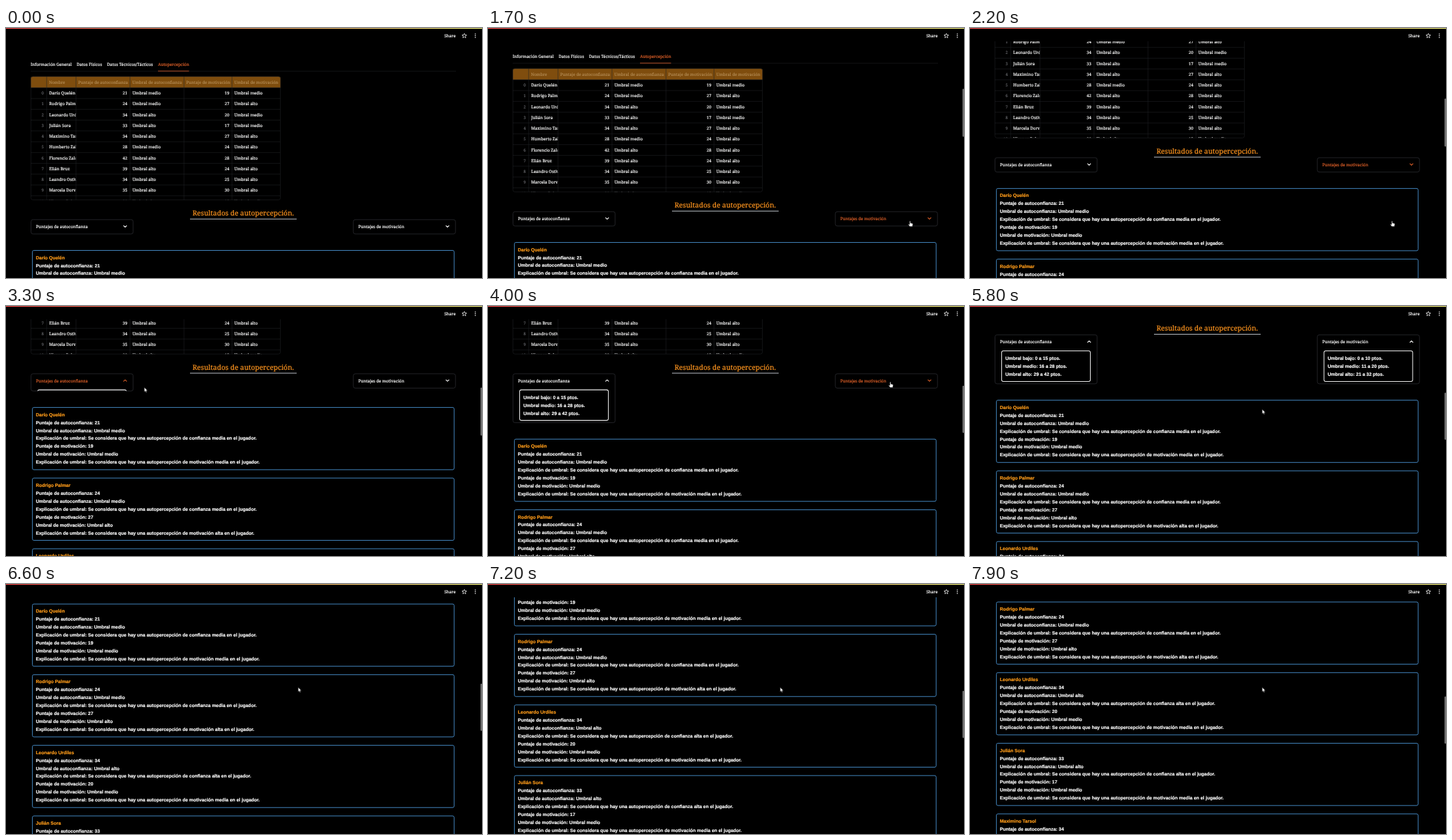
An HTML page for the animation above (8000 ms loop, 714x376 px).

```html
<!DOCTYPE html>
<html lang="es">
<head>
<meta charset="utf-8">
<title>Autopercepción</title>
<style>
  html, body { margin: 0; width: 100%; height: 100%; overflow: hidden; background: #000; }
  svg { display: block; width: 714px; height: 376px; color: #fff; }
  text { fill: currentColor; stroke: currentColor; stroke-width: .2; text-rendering: geometricPrecision; white-space: pre; }
  .serif { font: 6.2px "Noto Serif", serif; }
  .sans { font: bold 6.975px "Liberation Sans", Arial, sans-serif; }
  .title { font: 10.5px "Noto Serif", serif; color: #ff951f; }
  .name { color: #ff9c1a; }
  .dim { color: #85868c; stroke: none; }
  .head { color: #c4a06c; stroke: none; }
  .active { color: #dc5f28; }
  .end { text-anchor: end; }
  .line { fill: none; stroke: #212226; stroke-width: .6; }
  .panel { fill: #000; stroke: #2b2c31; stroke-width: .8; }
  .card { fill: none; stroke: #4488c2; stroke-width: 1; }
  .limits { fill: none; stroke: #f2f2f2; stroke-width: 1.05; }
  .chevron { fill: none; stroke-width: 1.1; stroke-linecap: round; stroke-linejoin: round; }
  .cursor { fill: #fff; stroke: #222; stroke-width: .5; stroke-linejoin: round; }
</style>
</head>
<body>
<svg id="stage" viewBox="0 0 714 376" xmlns="http://www.w3.org/2000/svg"></svg>
<script>
const LOOP = 8000, STEP = 100;
const NOTCH = 46.57, NOTCH_TIME = 368, NOTCH_LEAD = 122;
const WHEEL = [1700, 1900, 2400, 2500, 5400, 5800, 5900, 6500, 7000, 7600];
const OPEN_TIME = 560, OPEN_HEIGHT = 52;
const ROW = 16.25, CARD_PITCH = 106.25;

// name, confidence score, motivation score
const players = [
  ['Darío Quelén', 21, 19], ['Rodrigo Palmar', 24, 27], ['Leonardo Urdiles', 34, 20],
  ['Julián Sora', 33, 17], ['Maximino Tarsol', 34, 27], ['Humberto Zaldor', 28, 24],
  ['Florencio Zaldor', 42, 28], ['Elián Bruz', 39, 24], ['Leandro Ostiva', 34, 25],
  ['Marcela Dorvin', 35, 30], ['Nicanor Belmar', 30, 18]
];
const panels = [
  { x: 37.5, label: 'Puntajes de autoconfianza', limits: [15, 28, 42], openAt: 3300,
    hover: [[3000, 3400]] },
  { x: 521, label: 'Puntajes de motivación', limits: [10, 20, 32], openAt: 4200,
    hover: [[600, 2400], [3900, 4600]] }
];
const pointer = [
  [600, 648, 293], [700, 633, 290], [2700, 633, 290], [3100, 168, 112], [3200, 190, 115],
  [3300, 207.5, 122.5], [4000, 603.5, 114], [4300, 603.5, 114], [5000, 438.3, 155.5]
];
const handTimes = [[600, 2400], [3000, 3300], [3900, 4600]];

const clamp = v => Math.max(0, Math.min(1, v));
const smooth = p => p * p * (3 - 2 * p);
const within = (t, spans) => spans.some(([a, b]) => t >= a && t < b);
const isHigh = (score, limit) => score > limit;

const text = (x, y, str, cls = 'serif') => `<text x="${x}" y="${y}" class="${cls}">${str}</text>`;
const rect = (x, y, w, h, cls, rx = 0, extra = '') =>
  `<rect x="${x}" y="${y}" width="${w}" height="${h}" rx="${rx}" class="${cls}" ${extra}/>`;
const path = (d, cls, extra = '') => `<path d="${d}" class="${cls}" ${extra}/>`;

function tabs() {
  const labels = [[37, 'Información General'], [106, 'Datos Físicos'], [151.5, 'Datos Técnicos/Tácticos']];
  return labels.map(([x, s]) => text(x, 57.2, s)).join('') +
    text(228, 57.2, 'Autopercepción', 'serif active') +
    path('M37 65H675', 'line') +
    path('M228 64.8H274.5', '', 'stroke="#d0592a" stroke-width=".9"');
}

function table() {
  const threshold = high => 'Umbral ' + (high ? 'alto' : 'medio');
  const heads = [[64.5, 'Nombre'], [108.3, 'Puntaje de autoconfianza'], [189.5, 'Umbral de autoconfianza'],
    [270.3, 'Puntaje de motivación'], [342.5, 'Umbral de motivación']];
  const rows = players.map(([name, trust, drive], i) => {
    const y = 100.1 + ROW * i;
    return text(56.8, y, i, 'serif dim end') +
      `<g clip-path="url(#nameCell)">${text(64.8, y, name)}</g>` +
      text(182, y, trust, 'serif end') + text(189.7, y, threshold(isHigh(trust, 28))) +
      text(335, y, drive, 'serif end') + text(342.5, y, threshold(isHigh(drive, 20))) +
      path(`M37 ${89.8 + ROW * i}H411.5`, 'line');
  }).join('');
  const columns = [61, 105, 186, 267, 339].map(x => `M${x} 73V258.5`).join('');
  return `<g clip-path="url(#tableBox)">${rect(37, 73, 375, 16.8, '', 0, 'fill="#7f4d0e"')}` +
    heads.map(([x, s]) => text(x, 83.5, s, 'serif head')).join('') + rows +
    path(columns, 'line') + '</g>' + rect(37.4, 73, 374.2, 185.5, 'line', 3);
}

function panel({ x, label, limits: [low, mid, top] }, i) {
  const lines = [`Umbral bajo: 0 a ${low} ptos.`, `Umbral medio: ${low + 1} a ${mid} ptos.`,
    `Umbral alto: ${mid + 1} a ${top} ptos.`];
  return `<clipPath id="clip${i}">${rect(x, 288, 153.4, 21.5, '', 0, `id="clipRect${i}"`)}</clipPath>` +
    rect(x, 288.2, 153.2, 21.6, 'panel', 3, `id="panel${i}"`) +
    `<g id="content${i}" clip-path="url(#clip${i})">` + rect(x + 10, 312.4, 133, 46, 'limits', 2.5) +
    lines.map((s, k) => text(x + 15.5, 326.1 + 11.9 * k, s, 'sans')).join('') + '</g>' +
    `<g id="label${i}">${text(x + 7.6, 301, label)}</g>` +
    path('M-2.2 -1.1L0 1.1L2.2 -1.1', 'chevron', `id="chevron${i}"`);
}

function card([name, trust, drive], i) {
  const top = 334.5 + CARD_PITCH * i;
  const block = (field, score, high) => {
    const topic = field === 'autoconfianza' ? 'confianza' : field;
    return [`Puntaje de ${field}: ${score}`,
      `Umbral de ${field}: Umbral ${high ? 'alto' : 'medio'}`,
      `Explicación de umbral: Se considera que hay una autopercepción de ${topic} ${high ? 'alta' : 'media'} en el jugador.`];
  };
  const lines = [name, ...block('autoconfianza', trust, isHigh(trust, 28)),
    ...block('motivación', drive, isHigh(drive, 20))];
  return rect(39.6, top, 632.6, 93.6, 'card', 2.2) +
    lines.map((s, k) => text(44.8, top + 13.1 + 11.93 * k, s, k ? 'sans' : 'sans name')).join('');
}

function toolbar() {
  const star = Array.from({ length: 10 }, (_, k) => {
    const r = k % 2 ? 1.6 : 3.7, a = Math.PI * (k / 5 - .5);
    return `${(687.5 + r * Math.cos(a)).toFixed(2)},${(11.8 + r * Math.sin(a)).toFixed(2)}`;
  }).join(' ');
  return rect(0, 0, 714, 20, '', 0, 'fill="#000"') + rect(0, 0, 714, 1.1, '', 0, 'fill="url(#rainbow)"') +
    text(657.5, 13.6, 'Share') +
    `<polygon points="${star}" fill="none" stroke="#fafafa" stroke-width=".8" stroke-linejoin="round"/>` +
    [9, 11.6, 14.2].map(y => `<circle cx="704" cy="${y}" r=".8" fill="#fafafa"/>`).join('');
}

document.getElementById('stage').innerHTML = `
  <defs>
    <linearGradient id="rainbow"><stop stop-color="#ff4b4b"/><stop offset="1" stop-color="#fffd80"/></linearGradient>
    <clipPath id="nameCell">${rect(61, 73, 43.7, 186, '')}</clipPath>
    <clipPath id="tableBox">${rect(37, 73, 375, 185.5, '', 3)}</clipPath>
  </defs>
  <g id="page">${tabs()}${table()}
    ${text(279.7, 282.2, 'Resultados de autopercepción.', 'title')}
    ${path('M276 287.3H436', '', 'stroke="#d5dbe2" stroke-width=".9"')}
    ${panels.map(panel).join('')}
    <g id="cards">${players.slice(0, 6).map(card).join('')}</g>
  </g>
  ${toolbar()}
  ${rect(711.7, 0, 2.6, 72, '', 1, 'id="thumb" fill="#707070"')}
  <g id="cursor">
    ${path('M0 0V6.6L1.5 5.3L2.5 7.5L3.6 7L2.6 4.9L4.6 4.7Z', 'cursor', 'id="arrow"')}
    ${path('M-.6 .7Q0 -.4 .7 .7V3.3L3.6 4.1Q4.3 4.4 4.2 5.2L3.6 8.6H-.3L-2.4 5.7Q-2.3 4.6 -1.3 5.2L-.6 5.8Z', 'cursor', 'id="hand"')}
  </g>`;

const el = id => document.getElementById(id);
const set = (id, attrs) => Object.entries(attrs).forEach(([k, v]) => el(id).setAttribute(k, v));
const show = (id, on) => set(id, { visibility: on ? 'visible' : 'hidden' });

const eased = (elapsed, length) => smooth(clamp(elapsed / length));
const scrollAt = t => NOTCH * WHEEL.reduce((sum, start) =>
  sum + (t < start ? 0 : eased(t - start + NOTCH_LEAD, NOTCH_TIME)), 0);

function pointerAt(t) {
  const next = pointer.findIndex(key => key[0] > t);
  if (next < 1) return pointer[next < 0 ? pointer.length - 1 : 0].slice(1);
  const [a, b] = [pointer[next - 1], pointer[next]];
  const p = smooth((t - a[0]) / (b[0] - a[0]));
  return [1, 2].map(k => a[k] + (b[k] - a[k]) * p);
}

function render(time) {
  const t = Math.floor(time % LOOP / STEP) * STEP;
  const scroll = scrollAt(t);
  const opened = panels.map(p => eased(t - p.openAt + STEP, OPEN_TIME));
  const grow = Math.max(...opened);

  set('page', { transform: `translate(0 ${-scroll})` });
  set('cards', { transform: `translate(0 ${OPEN_HEIGHT * grow})` });
  panels.forEach((p, i) => {
    const height = 21.6 + OPEN_HEIGHT * opened[i];
    const color = within(t, p.hover) ? '#dc5f28' : '#fff';
    set('panel' + i, { height });
    set('clipRect' + i, { height });
    show('content' + i, opened[i] > 0);
    set('label' + i, { color });
    set('chevron' + i, {
      stroke: color,
      transform: `translate(${p.x + 141.2} 298.4) scale(1 ${opened[i] > 0 ? -1 : 1})`
    });
  });

  const active = t >= 600;
  set('thumb', { y: 89.3 - 2 * grow + scroll * (.181 - .005 * grow), height: 72 - 1.3 * grow });
  show('thumb', active);
  const hand = within(t, handTimes);
  set('cursor', { transform: `translate(${pointerAt(t).join(' ')})` });
  show('arrow', active && !hand);
  show('hand', active && hand);
}

const begin = performance.now();
function frame() {
  render(performance.now() - begin);
  requestAnimationFrame(frame);
}
frame();
</script>
</body>
</html>
```
